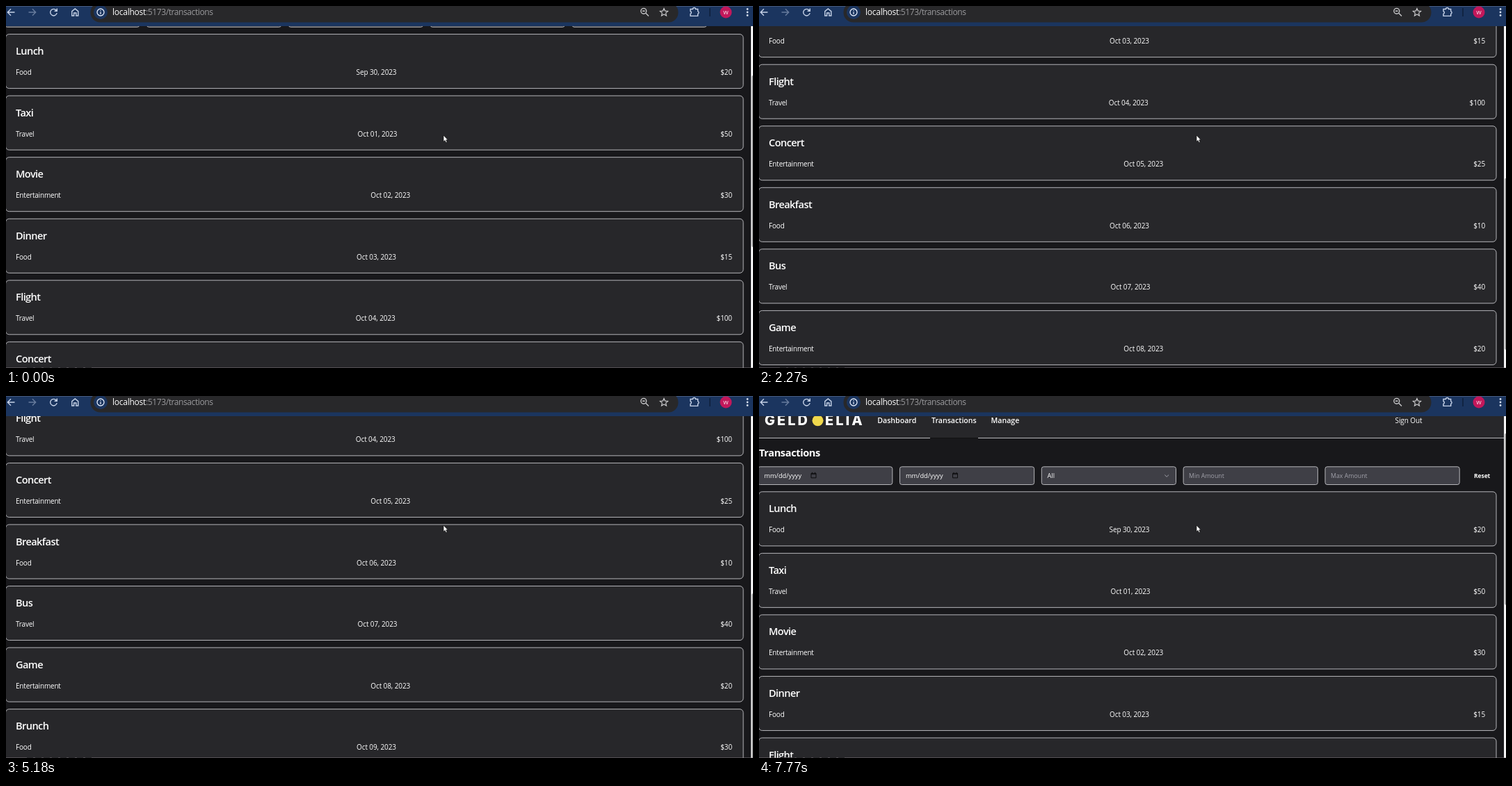
An HTML page that plays this animation: 1074x521 px, repeating every 8 s.

```html
<!DOCTYPE html>
<html lang="en">
<head>
<meta charset="utf-8">
<title>Transactions</title>
<style>
  html, body { margin: 0; width: 100%; height: 100%; overflow: hidden; background: #18181b; }
  svg { display: block; width: 1074px; height: 521px; }
  text { font-family: "Open Sans", "Noto Sans", sans-serif; fill: #fff; white-space: pre; }
  .card rect { fill: #27272a; stroke: #b6b6ba; }
  .name { font-size: 14.6px; font-weight: 600; letter-spacing: -.6px; }
  .title { font-size: 14.6px; font-weight: 700; letter-spacing: -.4px; }
  .cell { font-size: 10px; letter-spacing: -.1px; }
  .kind { letter-spacing: -.2px; }
  .field { fill: #3f3f46; stroke: #b6b6ba; }
  .input { font-size: 9.2px; }
  .hint { font-size: 8.8px; fill: #a1a1aa; }
  .reset { font-size: 8.4px; font-weight: 700; }
  .nav { font-size: 10.6px; font-weight: 600; }
  .brand { font: 800 20px Inter, sans-serif; letter-spacing: 3px; }
  .icon { fill: none; stroke: #c7d3e8; stroke-width: 1.4; }
  .url { font-size: 12px; letter-spacing: -.25px; }
  .path { fill: #9a9a9d; letter-spacing: -.4px; }
</style>
</head>
<body>
<svg viewBox="0 0 1074 521">
  <rect width="1074" height="521" fill="#18181b"/>
  <g id="head"></g>
  <g id="list"></g>

  <rect x="1071" y="29" width="3" height="492" fill="#f4f4f4"/>
  <rect id="thumb" x="1072" width="6" height="247" rx="2" fill="#a8a8a8"/>
  <rect y="520" width="1074" height="1" fill="#8a8288" opacity=".45"/>
  <path d="M30 520.5H125" stroke="#18181b" stroke-dasharray="9 3" opacity=".7"/>

  <g id="browser">
    <rect width="1074" height="29" fill="#1b355f"/>
    <rect width="1074" height="1" fill="#465b7d"/>
    <rect x="121.5" y="-5" width="845" height="28.5" rx="14" fill="#28282a"/>
    <path class="icon" d="M12.5 9H2.5M7 4.3L2.3 9L7 13.7"/>
    <path class="icon" d="M32.5 9H42.5M38 4.3L42.7 9L38 13.7" opacity=".45"/>
    <path class="icon" d="M72.3 6.2A4.8 4.8 0 1 0 73.2 10.2M73.3 3.6V7.2H69.6"/>
    <path class="icon" d="M94.8 7.6L99.3 4L103.8 7.6V14H100.9V10H97.7V14H94.8Z"/>
    <circle cx="136" cy="9" r="10" fill="#1b355f"/>
    <circle cx="136" cy="9" r="5" fill="none" stroke="#e4ecfa" stroke-width="1.3"/>
    <path d="M136 8.4V11.8M136 6V7.3" stroke="#e4ecfa" stroke-width="1.3"/>
    <text class="url" x="153" y="13">localhost<tspan class="path">:5173/transactions</tspan></text>
    <g class="icon" style="stroke:#c8c8ca">
      <circle cx="916.8" cy="7.3" r="3.9"/>
      <path d="M919.7 10.2L924 14.5M915 7.3H918.6"/>
      <path d="M946 3.4L947.6 7.1L951.6 7.5L948.6 10.1L949.5 14L946 11.9L942.5 14L943.4 10.1L940.4 7.5L944.4 7.1Z" stroke-width="1.2"/>
    </g>
    <path class="icon" d="M984 4.5H987.5A2 2 0 0 1 991.5 4.5H994.7V7.6A2 2 0 0 1 994.7 11.4V14.4H984V11.3A2 2 0 0 0 984 7.5Z"/>
    <path d="M1012 3V15" stroke="#0d1a30" stroke-width="1.2"/>
    <circle cx="1035" cy="9" r="8.5" fill="#c2185b"/>
    <text x="1035" y="12" font-size="8" text-anchor="middle">W</text>
    <g fill="#d3dcec">
      <circle cx="1066" cy="4.5" r="1.4"/><circle cx="1066" cy="9" r="1.4"/><circle cx="1066" cy="13.5" r="1.4"/>
    </g>
  </g>
  <path d="M629 186V195.3L631.1 193.4L632.6 196.6L634.2 195.9L632.8 192.8H635.3Z" fill="#fff" stroke="#000" stroke-width=".6"/>
</svg>

<script>
const LOOP = 8000, PITCH = 88.55;

// [start time, y of the first card]; the view jumps at each step
const steps = [
  [0, 40.6], [360, 5], [680, -52], [1000, -112], [1400, -164], [1750, -199.2],
  [2040, -236], [2270, -270], [2600, -300], [2940, -332.3], [3270, -346],
  [3550, -350], [5180, -346.3], [5420, -310], [5730, -228], [6030, -148],
  [6320, -69.6], [6650, 32.6], [6910, 35], [7160, 71], [7460, 93], [7770, 137.8]
];

const kinds = [["Food", 23.5], ["Travel", 26.5], ["Entertainment", 64]];
const items = [
  ["Lunch", 20], ["Taxi", 50], ["Movie", 30], ["Dinner", 15], ["Flight", 100],
  ["Concert", 25], ["Breakfast", 10], ["Bus", 40], ["Game", 20], ["Brunch", 30]
];

const byId = id => document.getElementById(id);
const text = (cls, x, y, str, anchor = "start") =>
  `<text class="${cls}" x="${x}" y="${y}" text-anchor="${anchor}">${str}</text>`;

function card([name, price], i) {
  const [kind, width] = kinds[i % 3];
  const amount = "$" + price;
  const date = i ? `Oct 0${i}, 2023` : "Sep 30, 2023";
  const mid = 529 + (width - amount.length * 5.5) / 2;
  return `<g class="card" transform="translate(0 ${i * PITCH})">` +
    `<rect x="-.5" width="1060.5" height="78" rx="5"/>` +
    text("name", 14, 29.5, name) +
    text("cell kind", 14, 58.5, kind) +
    text("cell", mid, 58.5, date, "middle") +
    text("cell", 1044, 58.5, amount, "end") + `</g>`;
}

// Header parts sit above the first card, at negative y
function header() {
  const field = i => `<rect class="field" x="${-1.4 + 203.85 * i}" y="-36" width="193.2" height="25.7" rx="3"/>`;
  const calendar = x =>
    `<path d="M${x} -26.5h7v6.5h-7zM${x} -25.5h7M${x + 1.5} -28v1.5M${x + 5.5} -28v1.5" fill="none" stroke="#0c0c0e"/>`;
  return `<rect y="-140" width="1071" height="63" fill="#27272a"/>` +
    `<path d="M0 -77.3H246M315 -77.3H1071" stroke="#b6b6ba"/>` +
    `<path d="M246 -77.3H315" stroke="#111113"/>` +
    text("brand", 8, -95.5, "GELD") +
    `<circle cx="84.5" cy="-102.5" r="8" fill="#f0d84c"/>` +
    text("brand", 95, -95.5, "ELIA") +
    text("nav", 170.3, -98.5, "Dashboard") +
    text("nav", 248, -98.5, "Transactions") +
    text("nav", 333.5, -98.5, "Manage") +
    text("cell", 914.5, -98.5, "Sign Out") +
    text("title", 0, -50.5, "Transactions") +
    [0, 1, 2, 3, 4].map(field).join("") +
    text("input", 7.5, -19.5, "mm/dd/yyyy") + calendar(75) +
    text("input", 211, -19.5, "mm/dd/yyyy") + calendar(278.5) +
    text("input", 414.5, -19.5, "All") +
    `<path d="M583.3 -24.3L586.2 -21.5L589.1 -24.3" fill="none" stroke="#a1a1aa"/>` +
    text("hint", 618, -19.5, "Min Amount") +
    text("hint", 822, -19.5, "Max Amount") +
    text("reset", 1028, -20, "Reset");
}

byId("head").innerHTML = header();
byId("list").innerHTML = items.map(card).join("");

function draw(now) {
  const t = now % LOOP;
  const top = steps.findLast(([start]) => start <= t)[1];
  for (const id of ["head", "list"]) byId(id).setAttribute("transform", `translate(0 ${top})`);
  byId("thumb").setAttribute("y", 100 + (steps[0][1] - top) * .476);
}

function tick() {
  draw(performance.now());
  requestAnimationFrame(tick);
}
tick();
</script>
</body>
</html>
```
